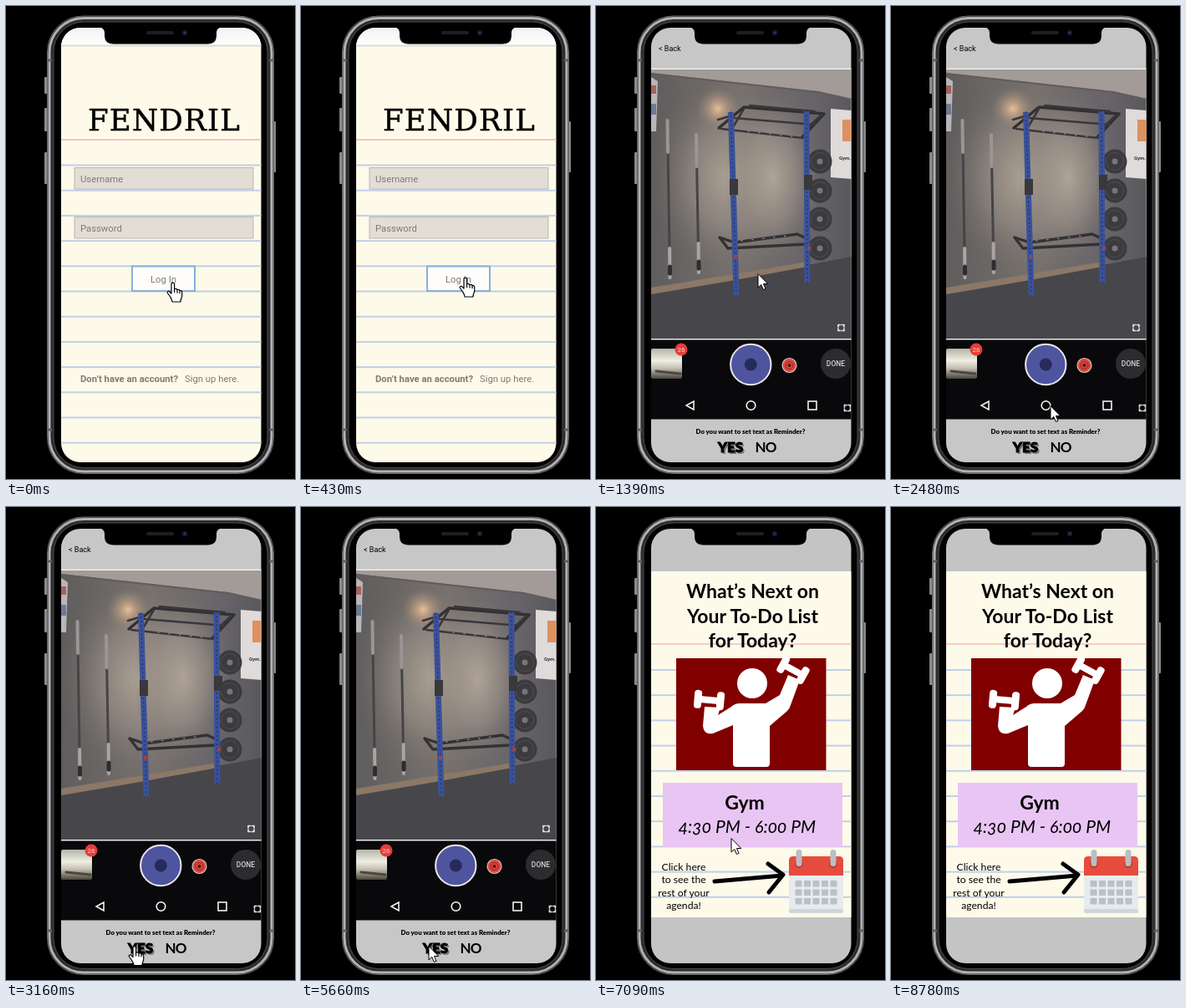
Recreate the animation shown at these times as an HTML page. Size 346 by 566 pixels, loop 9.96 s.

```html
<!DOCTYPE html>
<html lang="en">
<head>
<meta charset="utf-8">
<title>Phone app walkthrough</title>
<style>
  html, body { margin: 0; width: 100%; height: 100%; overflow: hidden; background: #000; }
  svg { display: block; width: 346px; height: 566px; }
  .mid { text-anchor: middle; }
  .roboto { font-family: Roboto, sans-serif; }
  .lato { font-family: Lato, sans-serif; font-variant-numeric: oldstyle-nums; }
  .title { font: 35.6px "DejaVu Serif", serif; letter-spacing: 1.2px; stroke: #000; stroke-width: .5px; }
  .form { font-size: 11.3px; fill: #7f7b75; }
  .m { font-weight: 500; }
  .b { font-weight: 700; }
  .black { font-weight: 900; }
  .line { fill: none; stroke-linecap: round; stroke-linejoin: round; }
</style>
</head>
<body>
<svg viewBox="0 0 346 566" xmlns="http://www.w3.org/2000/svg">
  <defs>
    <clipPath id="screen"><rect x="66" y="26" width="239.5" height="520" rx="23"/></clipPath>
    <clipPath id="photo"><rect x="66" y="76" width="240" height="322"/></clipPath>
    <linearGradient id="bar" x1="0" y1="0" x2="0" y2="1">
      <stop offset="0" stop-color="#f2f2f2"/><stop offset="1" stop-color="#fff"/>
    </linearGradient>
    <linearGradient id="wall" x1="0" y1="0" x2="1" y2="0">
      <stop offset="0" stop-color="#5f5d5d"/><stop offset=".45" stop-color="#76716d"/><stop offset=".8" stop-color="#67646a"/><stop offset="1" stop-color="#59585c"/>
    </linearGradient>
    <radialGradient id="lamp">
      <stop offset="0" stop-color="#e6c09a"/><stop offset=".4" stop-color="#b99b80" stop-opacity=".75"/><stop offset="1" stop-color="#8b7f75" stop-opacity="0"/>
    </radialGradient>
    <radialGradient id="glow">
      <stop offset="0" stop-color="#b3a799" stop-opacity=".9"/><stop offset=".5" stop-color="#9b9188" stop-opacity=".6"/><stop offset="1" stop-color="#77706b" stop-opacity="0"/>
    </radialGradient>
    <linearGradient id="thumb" x1="0" y1="0" x2="0" y2="1">
      <stop offset="0" stop-color="#b3b5a8"/><stop offset=".4" stop-color="#efeee2"/><stop offset=".65" stop-color="#c3c0b3"/><stop offset="1" stop-color="#4a443c"/>
    </linearGradient>
  </defs>

  <rect width="346" height="566"/>
  <g fill="#8b8b8d">
    <rect x="46" y="85" width="4" height="20" rx="1"/>
    <rect x="46" y="122" width="4" height="28" rx="1"/>
    <rect x="46" y="175" width="4" height="38" rx="1"/>
    <rect x="319" y="138" width="4" height="61" rx="1"/>
  </g>
  <rect x="49.5" y="12" width="271" height="547.5" rx="43" fill="#2c2c2e" stroke="#6c6c6e"/>
  <rect x="52" y="14.5" width="266" height="542.5" rx="41" fill="#2c2c2e" stroke="#b2b2b4" stroke-width="3"/>
  <rect x="57" y="19" width="256" height="533.5" rx="36" fill="#000" stroke="#4a4a4c"/>
  <path d="M50 65h5M315 65h5M50 507h5M315 507h5" stroke="#606062" stroke-width="3"/>

  <g clip-path="url(#screen)">
    <g id="login"></g>
    <g id="camera"></g>
    <g id="agenda"></g>
  </g>
  <path d="M112 25H258Q252 27 252 32V35Q252 45.5 241 45.5H129Q118 45.5 118 35V32Q118 27 112 25Z"/>
  <rect x="168" y="30" width="33" height="4" rx="2" fill="#1f1f21"/>
  <circle cx="214" cy="32" r="3.2" fill="#15172d"/><circle cx="214" cy="32" r="1.3" fill="#30376b"/>

  <g stroke="#000" fill="#fff" stroke-linejoin="round">
    <path id="arrow" d="M0 0V16.5L3.8 13L6.4 19L9 17.9L6.5 12H11.8Z"/>
    <path id="hand" stroke-width="1.2" d="M-2 2C-2-.6 1.6-.6 1.6 2V8C2 6.8 5 7 5 9C5.5 7.8 8 8 8 10C8.5 9 10.7 9.5 10.7 11.5V16C10.7 18 9 19 9 23H-1C-1 20-3 18-4 16L-6.6 12.5C-7.6 10.5-5 9.5-3.5 11.5L-2 13ZM1.6 8V12M5 9V12.5M8 10V13"/>
  </g>
</svg>

<script>
const $ = id => document.getElementById(id);
const rect = (x, y, w, h, fill, more = '') => `<rect x="${x}" y="${y}" width="${w}" height="${h}" fill="${fill}" ${more}/>`;
const disc = (x, y, r, fill, more = '') => `<circle cx="${x}" cy="${y}" r="${r}" fill="${fill}" ${more}/>`;
const oval = (x, y, rx, ry, fill) => `<ellipse cx="${x}" cy="${y}" rx="${rx}" ry="${ry}" fill="${fill}"/>`;
const text = (x, y, s, cls, size, more = '') => `<text x="${x}" y="${y}" class="${cls}" ${size ? `font-size="${size}"` : ''} ${more}>${s}</text>`;
const line = (d, color, w, more = '') => `<path class="line" d="${d}" stroke="${color}" stroke-width="${w}" ${more}/>`;
const shape = (d, fill) => `<path d="${d}" fill="${fill}"/>`;
const repeat = (n, fn) => Array.from({ length: n }, (_, i) => fn(i)).join('');
const rules = (y, n, gap) => repeat(n, i => rect(66, y + i * gap, 240, 2, '#bfd0e8'));
const corners = (x, y) => line(`M${x - 3.5} ${y - 1}v-2.5h2.5M${x + 1} ${y - 3.5}h2.5v2.5M${x + 3.5} ${y + 1}v2.5h-2.5M${x - 1} ${y + 3.5}h-2.5v-2.5`, '#e6e6e6', 1.7);

function loginScreen() {
  const field = (y, label) => rect(82, y, 214, 25.5, '#e2ded6', 'stroke="#b9b6ae"') + text(89, y + 17.5, label, 'roboto form');
  return rect(66, 26, 240, 520, '#fefaea')
    + rect(66, 26, 240, 21, 'url(#bar)') + rect(66, 46.5, 240, 2, '#dcdad6')
    + rect(66, 159, 240, 2, '#f8c3bf') + rules(189.5, 12, 30.2)
    + text(189.5, 149, 'FENDRIL', 'title mid')
    + field(193.5, 'Username') + field(252.5, 'Password')
    + rect(151, 311.5, 75, 29.5, '#fefdfb', 'stroke="#86b0da" stroke-width="2"')
    + text(188.5, 330.5, 'Log In', 'roboto form mid')
    + text(89, 450, 'Don’t have an account?', 'roboto form b')
    + text(214, 450, 'Sign up here.', 'roboto form');
}

function barbell(x, top, bottom) {
  return line(`M${x} ${top}L${x + 3} ${bottom}`, '#454446', 3)
    + line(`M${x} ${top}l.5 38`, '#9a9694', 4)
    + line(`M${x + 2.6} ${bottom - 35}l.4 35`, '#a9a5a4', 4)
    + line(`M${x + 3} ${bottom - 13}v8`, '#2d2d31', 5);
}

function post(x1, y1, x2, y2) {
  const d = `M${x1} ${y1}L${x2} ${y2}`;
  return `<path d="${d}" stroke="#3a519b" stroke-width="7"/>`
    + line(d, '#222f5c', 1.7, 'stroke-dasharray=".1 5"');
}

function gymPhoto() {
  const plate = y => disc(268, y, 14.5, '#3b3a3d') + disc(268, y, 10.5, 'none', 'stroke="#4e4d50"') + disc(268, y, 3.5, '#77757a');
  return '<g clip-path="url(#photo)">'
    + rect(66, 76, 240, 322, 'url(#wall)')
    + oval(160, 205, 95, 120, 'url(#glow)') + oval(212, 205, 60, 105, 'url(#glow)')
    + shape('M66 76H306V111L266 102L66 80Z', '#a29b97')
    + line('M66 81L266 103L306 112', '#625d5b', 2)
    + disc(146, 123, 26, 'url(#lamp)')
    + shape('M66 343L158 328L306 300V398H66Z', '#47464b')
    + shape('M66 337L158 322L253 306V312L158 329.5L66 345Z', '#8b7867')
    + shape('M66 85L74 90L72 150H66Z', '#b8b6b8')
    + rect(66, 95, 6, 10, '#a8615d') + rect(66, 117, 6, 13, '#6e7a94')
    + shape('M281 123L306 125V207L281 205Z', '#dedbda')
    + rect(295, 136, 11, 26, '#dc9160')
    + text(291, 184, 'Gym.', 'roboto b', 6, 'fill="#333"')
    + barbell(85.5, 137, 325) + barbell(120, 154, 319)
    + [186, 221, 255, 290].map(plate).join('')
    + line('M147 146L177 121L273 129L247 157', '#313033', 3.5)
    + line('M146 136L163 131M150 147L248 158M165 134L262 142M184 119L262 126', '#39373a', 2.6)
    + line('M177 123L164 145M270 130L251 148', '#39373a', 2.6)
    + line('M148 277L166 283L241 273L254 279M148 277L158 290L251 285', '#333235', 3.4)
    + line('M182 150L235 156M174 281L238 274', '#85848a', 1.5, 'stroke-dasharray="1 12"')
    + post(161.5, 127, 168, 346) + post(252, 126, 253, 331)
    + rect(160, 207, 10, 19, '#39383b') + rect(249, 202, 10, 18, '#39383b')
    + rect(165, 298, 4, 4, '#a04448') + rect(253, 288, 4, 4, '#a04448')
    + corners(293.5, 385) + '</g>';
}

function cameraScreen() {
  const nav = 'stroke="#fff" stroke-width="1.5"';
  return rect(66, 26, 240, 520, '#c7c7c7')
    + text(75, 54, '&lt; Back', 'roboto', 9)
    + rect(66, 74.5, 240, 325, '#eee') + gymPhoto()
    + rect(66, 399.5, 240, 95, '#09090b')
    + rect(66, 410, 37, 36, 'url(#thumb)', 'rx="2"') + line('M72 437L101 440', '#4d463e', 3)
    + disc(102, 411, 7.5, '#e63e38') + text(102, 414, '26', 'roboto mid', 8, 'fill="#f6d5d2"')
    + disc(185.3, 429, 24.2, '#4e549e', 'stroke="#e8e8ea" stroke-width="2"')
    + disc(185.3, 429, 7.5, '#282b59')
    + disc(231.5, 430, 8.5, '#dd463e', 'stroke="#d8c3c0" stroke-width="1.2"')
    + disc(231.5, 430, 4.5, 'none', 'stroke="#872520"') + disc(231.5, 430, 2, '#4a1513')
    + disc(287, 428, 18, '#2c2c2f') + text(287, 431, 'DONE', 'roboto mid m', 8.5, 'fill="#d2d2d2"')
    + `<path d="M117 473V483L108 478Z" fill="none" ${nav}/>`
    + disc(185.5, 478, 5.3, 'none', nav) + rect(254, 473, 10, 10, 'none', nav)
    + corners(301, 481)
    + text(185, 512, 'Do you want to set text as Reminder?', 'lato black mid', 7.8)
    + text(163, 535.5, 'YES', 'lato black mid', 17, 'fill="#777"')
    + text(161, 533.5, 'YES', 'lato black mid', 17, 'stroke="#000" stroke-width=".8"')
    + text(203, 533.5, 'NO', 'lato b mid', 17, 'letter-spacing="-1"');
}

function dumbbell(x, y, angle) {
  return `<g transform="translate(${x} ${y}) rotate(${angle})">`
    + rect(-18, -11, 9, 22, '#fff', 'rx="4"') + rect(9, -11, 9, 22, '#fff', 'rx="4"')
    + rect(-11, -4, 22, 8, '#fff') + '</g>';
}

function calendar() {
  const ring = x => disc(x, 427, 5, '#c0392f') + rect(x - 3.5, 410, 7, 20, '#b9bec3', 'rx="3.5"');
  return rect(231, 418, 65, 68, '#e8ebee', 'rx="5"')
    + rect(231, 481, 65, 5, '#cfd5d9', 'rx="2.5"')
    + shape('M231 441V423Q231 418 236 418H291Q296 418 296 423V441Z', '#e64c3d')
    + ring(243) + ring(284)
    + repeat(15, i => rect(238.5 + i % 5 * 10.5, 447 + Math.floor(i / 5) * 10.5, 8, 7.5, '#b9c1c8'));
}

function agendaScreen() {
  const lines = (list, x, y, gap, cls, size) => list.map((s, i) => text(x, y + i * gap, s, cls, size)).join('');
  return rect(66, 26, 240, 520, '#c4c4c4') + rect(66, 77, 240, 414, '#fefaea')
    + rect(66, 163, 240, 2, '#f5cbc8') + rules(194, 10, 30.2)
    + lines(['What’s Next on', 'Your To-Do List', 'for Today?'], 187.5, 109, 29.5, 'lato b mid', 23)
    + rect(96, 181, 179.5, 134, '#800000')
    + disc(187, 211, 18, '#fff')
    + shape('M130 239L128 262Q129 273 140 271L164 261V307Q164 311 168 311H204Q208 311 208 307V262L229 244Q232 241 233 237L244 207L230 201L220 225L203 235H172Q166 235 162 239L146 249L149 240Z', '#fff')
    + dumbbell(135.5, 231, 5) + dumbbell(236, 195, 29)
    + rect(80, 330, 215, 77, '#e9c5f3')
    + text(178, 362, 'Gym', 'lato b mid', 23)
    + text(181, 390, '4:30 PM - 6:00 PM', 'lato mid', 21, 'font-style="italic"')
    + lines(['Click here', 'to see the', 'rest of your', 'agenda!'], 105, 435, 15.4, 'lato mid', 12.2)
    + line('M142 448L223 441M206 427L224 440L207 461', '#000', 5)
    + calendar();
}

const screens = { login: loginScreen(), camera: cameraScreen(), agenda: agendaScreen() };
for (const id in screens) $(id).innerHTML = screens[id];

const LOOP = 9960;
// start time, screen, cursor, tip x, tip y
const steps = [
  [0, 'login', 'hand', 200, 331], [430, 'login', 'hand', 197, 325], [550, 'login', 'hand', 194, 321],
  [1390, 'camera', 'arrow', 194, 320.5], [2170, 'camera', 'arrow', 194, 323.5], [2320, 'camera', 'arrow', 201, 361.5],
  [2480, 'camera', 'arrow', 191, 478.5], [2630, 'camera', 'arrow', 174, 530], [2760, 'camera', 'arrow', 163, 548],
  [2910, 'camera', 'arrow', 160, 541], [3035, 'camera', 'hand', 156, 530], [3160, 'camera', 'hand', 154, 525.5],
  [5660, 'camera', 'arrow', 153, 525.5], [5810, 'agenda', 'arrow', 153, 525.5],
  [6550, 'agenda', 'arrow', 160, 470], [6670, 'agenda', 'arrow', 162.5, 420.5], [6820, 'agenda', 'arrow', 162.5, 404],
  [6940, 'agenda', 'arrow', 162.5, 397], [7090, 'agenda', 'arrow', 162, 396.5],
  [8370, 'agenda', 'arrow', 205, 455], [8500, 'agenda', 'arrow', 249.5, 520.5], [8650, 'agenda', 'arrow', 263, 549],
  [8780, 'agenda', '', 0, 0]
];
const show = (id, on) => $(id).style.display = on ? '' : 'none';

let current;
function draw() {
  const t = performance.now() % LOOP;
  const step = steps.findLast(s => s[0] <= t);
  if (step !== current) {
    current = step;
    const [, screen, cursor, x, y] = step;
    for (const id in screens) show(id, id === screen);
    for (const id of ['arrow', 'hand']) {
      show(id, id === cursor);
      $(id).setAttribute('transform', `translate(${x} ${y})`);
    }
  }
  requestAnimationFrame(draw);
}
draw();
</script>
</body>
</html>
```
